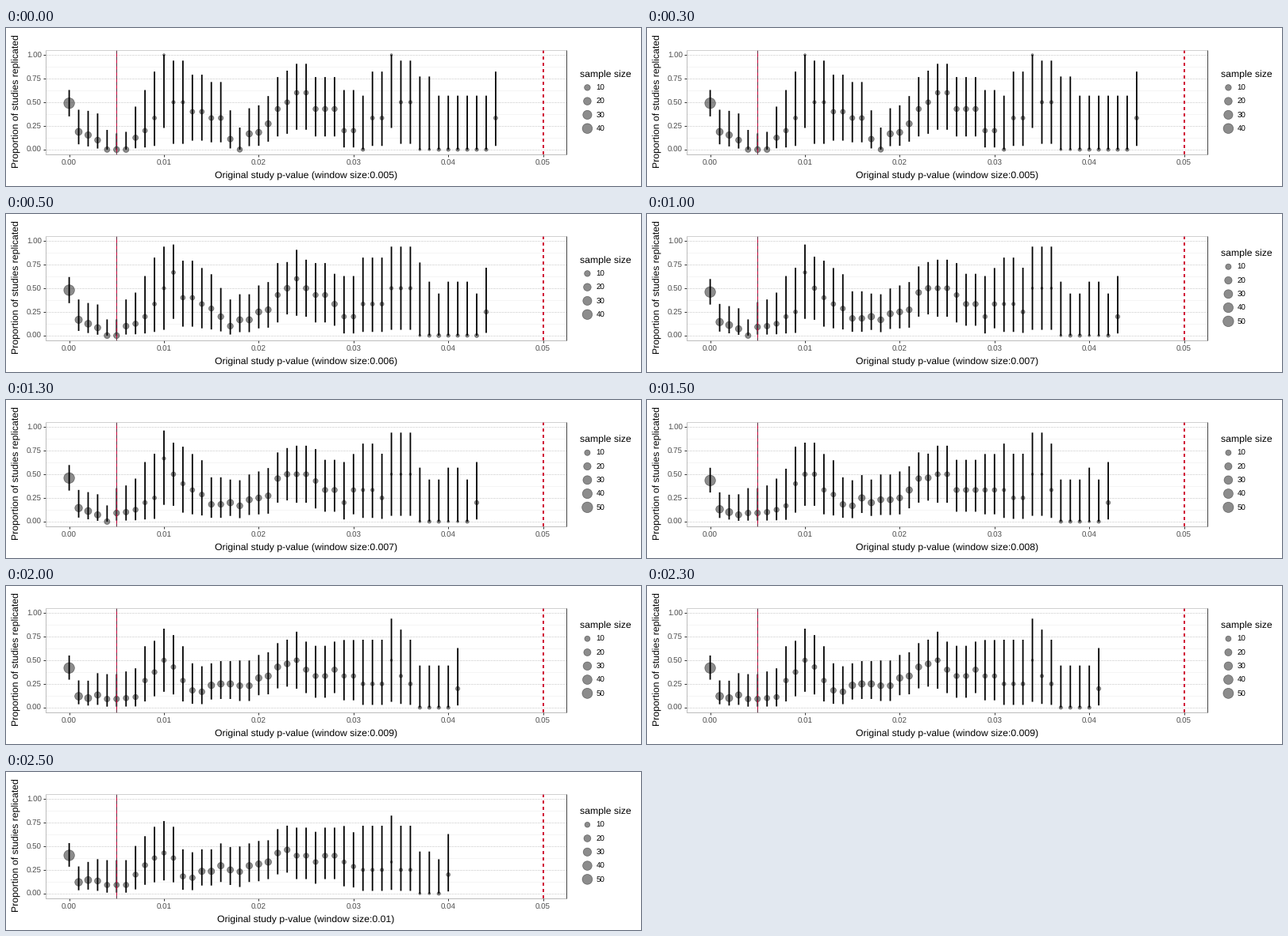
Recreate the animation shown at these times as a matplotlib script. Size 800x200 px, loop 3000 ms.

```python
import numpy as np
import matplotlib.pyplot as plt
from matplotlib.animation import FuncAnimation
from matplotlib.patches import Circle

W, H = 800, 200
LEFT, RIGHT, TOP, BOTTOM = 49.9, 706.4, 27.9, 159.7
GREY, DARK, CRIMSON = "#4d4d4d", "#333333", "#d00038"
WINDOWS = range(5, 11)
plt.rcParams.update({"font.family": "Liberation Sans", "text.hinting": "none"})

# p-values in thousandths: each replicated study, then failures by studies per bin.
REPLICATED = [0] * 20 + [1, 2, 3, 11, 16, 17, 23, 23, 25, 28, 28, 30, 36, 49]
FAILED = {1: [5, 15, 19, 20, 22, 39, 43, 44, 48, 49],
          2: [6, 8, 9, 17, 28, 30, 33],
          3: [3, 7, 23], 4: [1, 21], 5: [2], 12: [0]}

hits = np.bincount(REPLICATED, minlength=50)
studies = hits.copy()
for size, bins in FAILED.items():
    studies[bins] += size

fig = plt.figure(figsize=(W / 72, H / 72), dpi=72, facecolor="white")
ax = fig.add_axes([0, 0, 1, 1])


def px(p):
    return 79.6 + p * 11940


def py(v):
    return 153.9 - v * 119.9


def interval(n, k, level=0.95):
    """Jeffreys interval, one-sided when no or all studies replicate."""
    t = np.linspace(0, np.pi / 2, 3001)
    mid = (t[1:] + t[:-1]) / 2
    density = np.sin(mid) ** (2 * k) * np.cos(mid) ** (2 * (n - k))
    cdf = np.append(0, np.cumsum(density))
    tail = 1 - level
    if k == 0:
        probs = [0, level]
    elif k == n:
        probs = [tail, 1]
    else:
        probs = [tail / 2, 1 - tail / 2]
    return np.sin(np.interp(probs, cdf / cdf[-1], t)) ** 2


def radius(n, low, high):
    size = 1 + 5 * np.sqrt((n - low) / (high - low))
    return 0.375 * (size * 2.845 + 0.945)


def dot(x, y, r):
    ax.add_patch(Circle((x, y), r, fc=(0, 0, 0, 0.45), ec=(0, 0, 0, 0.45),
                        lw=0.7, zorder=2))


def label(x, y, s, size=9.7, color="black", **kw):
    ax.text(x, y, s, fontsize=size, color=color, **kw)


def line(xs, ys, color, lw, zorder=1, **kw):
    ax.plot(xs, ys, color=color, lw=lw, zorder=zorder,
            solid_capstyle="butt", dash_capstyle="butt", **kw)


def draw_panel():
    for v in np.arange(0.125, 1, 0.25):
        line([LEFT, RIGHT], [py(v)] * 2, "#f2f2f2", 0.7)
    for v in np.arange(0, 1.01, 0.25):
        line([LEFT, RIGHT], [py(v)] * 2, "#d4d4d4", 0.7, ls=(0, (4, 1)))
        line([LEFT - 3, LEFT], [py(v)] * 2, DARK, 1)
        label(45, py(v) + 3.5, f"{v:.2f}", color=GREY, ha="right")
    for p in np.arange(0, 0.051, 0.01):
        line([px(p)] * 2, [BOTTOM, BOTTOM + 3], DARK, 1)
        label(px(p), 173.5, f"{p:.2f}", color=GREY, ha="center")


def draw_border():
    line([LEFT, RIGHT], [TOP, TOP], "#bdbdbd", 0.7, zorder=5)
    line([LEFT, LEFT, RIGHT], [TOP, BOTTOM, BOTTOM], "#a0a0a0", 0.7, zorder=5)
    line([RIGHT, RIGHT], [TOP, BOTTOM], DARK, 0.9, zorder=5)


def draw_thresholds():
    strict, usual = px(0.005), px(0.05)
    line([strict] * 2, [BOTTOM, TOP], CRIMSON, 1, zorder=4)
    line([strict] * 2, [BOTTOM, TOP], "#5c3040", 1, zorder=4, ls=(0, (4, 4)))
    line([usual] * 2, [BOTTOM, TOP], CRIMSON, 2, zorder=4, ls=(0, (2, 2)))


def draw_legend(low, high):
    keys = range(10, high + 1, 10)
    top = 101.3 - 8.64 * (len(keys) - 1)
    label(723, top - 13, "sample size", 12.2)
    for i, n in enumerate(keys):
        y = top + 17.28 * i
        dot(732.4, y, radius(n, low, high))
        label(743.5, y + 3.6, str(n))


def draw(frame):
    width = WINDOWS[frame]
    ax.clear()
    ax.set(xlim=(0, W), ylim=(H, 0))
    ax.axis("off")
    draw_panel()

    window = np.ones(width, int)
    totals = np.convolve(studies, window, "valid")
    successes = np.convolve(hits, window, "valid")
    low, high = totals.min(), totals.max()
    for start, (n, k) in enumerate(zip(totals, successes)):
        x = px(start / 1000)
        dot(x, py(k / n), radius(n, low, high))
        line([x, x], py(interval(n, k)), "black", 1.8, zorder=3, snap=False)

    draw_thresholds()
    draw_border()
    draw_legend(low, high)
    label(378, 191, f"Original study p-value (window size:{width / 1000:g})",
          12.2, ha="center")
    label(13.3, 93, "Proportion of studies replicated", 12.2,
          ha="center", va="center", rotation=90)


anim = FuncAnimation(fig, draw, frames=len(WINDOWS), interval=500,
                     init_func=lambda: None, repeat=True, repeat_delay=0)
plt.show()
```
